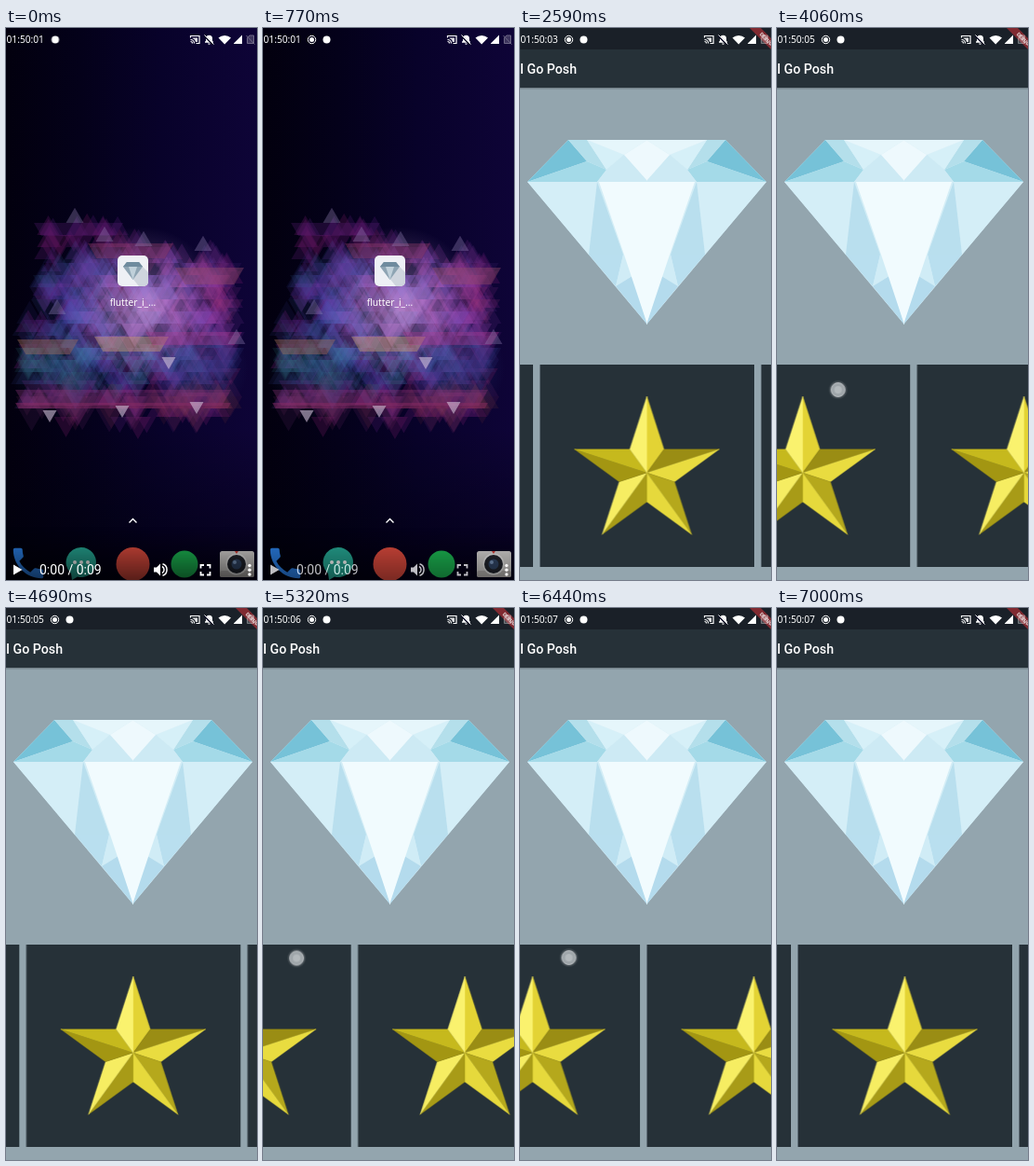
Write an HTML page with a canvas that moves like this. It is 270 px wide and 592 px high and loops after 7.07 s.

```html
<!DOCTYPE html>
<html lang="en">
<head>
<meta charset="utf-8">
<title>Phone demo</title>
<style>
html, body { margin: 0; width: 100%; height: 100%; overflow: hidden; background: #04000f; }
canvas, #stage { position: absolute; left: 0; top: 0; width: 100%; height: 100%; display: block; }
.sys { font-family: "Noto Sans", "Open Sans", sans-serif; fill: #fff; }
.rob { font-family: Roboto, Arial, sans-serif; fill: #fff; }
.anim { animation: 7070ms linear infinite; }

#controls { animation-name: controls; }
@keyframes controls { 0%, 9.9% { opacity: 1 } 13.9%, 100% { opacity: 0 } }

#rec { animation-name: rec; animation-timing-function: step-end; }
@keyframes rec { 0% { opacity: 0 } 9.9%, 100% { opacity: 1 } }
#note { animation-name: note; animation-timing-function: step-end; }
@keyframes note { 0% { transform: translateX(-15.5px) } 9.9%, 100% { transform: none } }

#clock { animation-name: clock; animation-timing-function: step-end; }
@keyframes clock {
  0% { transform: none }
  14.29% { transform: translateY(-20px) }
  28.43% { transform: translateY(-40px) }
  42.57% { transform: translateY(-60px) }
  56.72% { transform: translateY(-80px) }
  70.86% { transform: translateY(-100px) }
  85.01%, 100% { transform: translateY(-120px) }
}

#app { transform-origin: 136px 260px; animation-name: launch; }
@keyframes launch {
  0%, 22.77% { opacity: 0; transform: scale(.15); animation-timing-function: cubic-bezier(.2, .6, .3, 1) }
  24.5% { opacity: 1 }
  26.73%, 100% { opacity: 1; transform: none }
}
#splash { animation-name: splash; animation-timing-function: step-end; }
@keyframes splash { 0% { opacity: 1 } 30.69%, 100% { opacity: 0 } }
.late { animation-name: late; animation-timing-function: step-end; }
@keyframes late { 0% { opacity: 0 } 33.66%, 100% { opacity: 1 } }

/* three left swipes, each followed by a settle to the next card */
#track { animation-name: track; }
@keyframes track {
  0%, 50.495% { transform: none; animation-timing-function: cubic-bezier(.5, .1, .8, .8) }
  57.426% { transform: translateX(-108.5px) }
  58.416% { transform: translateX(-135px); animation-timing-function: cubic-bezier(.15, .6, .3, 1) }
  67.19%, 69.307% { transform: translateX(-238px); animation-timing-function: cubic-bezier(.5, .1, .8, .8) }
  75.248% { transform: translateX(-395px) }
  76.238% { transform: translateX(-420px); animation-timing-function: cubic-bezier(.15, .6, .3, 1) }
  83.45%, 87.27% { transform: translateX(-476px); animation-timing-function: cubic-bezier(.5, .1, .8, .8) }
  91.089% { transform: translateX(-598.5px) }
  92.08% { transform: translateX(-630px); animation-timing-function: cubic-bezier(.15, .6, .3, 1) }
  99.01% { transform: translateX(-713px) }
  100% { transform: translateX(-714px) }
}
#finger { animation-name: finger; }
@keyframes finger {
  0%, 30% { transform: translate(137px, 262px); animation-timing-function: step-end }
  48.515% { transform: translate(192.5px, 394px) }
  50.495% { transform: translate(174.5px, 393px); animation-timing-function: cubic-bezier(.5, .1, .8, .8) }
  57.426% { transform: translate(66px, 388px) }
  58.416% { transform: translate(39.5px, 387px); animation-timing-function: step-end }
  68.32% { transform: translate(211.5px, 384px) }
  69.307% { transform: translate(193.5px, 383px); animation-timing-function: cubic-bezier(.5, .1, .8, .8) }
  75.248% { transform: translate(36.5px, 375.5px) }
  76.238% { transform: translate(12px, 374px); animation-timing-function: step-end }
  86.28% { transform: translate(193.5px, 384px) }
  87.27% { transform: translate(175.5px, 383px); animation-timing-function: cubic-bezier(.5, .1, .8, .8) }
  91.089% { transform: translate(53px, 375px) }
  92.08%, 100% { transform: translate(21.5px, 373px) }
}
#touch { animation-name: touch; animation-timing-function: step-end; }
@keyframes touch {
  0% { opacity: 0 }
  21.07% { opacity: 1 } 23.2% { opacity: 0 }
  48.515% { opacity: 1 } 58.416% { opacity: 0 }
  68.32% { opacity: 1 } 76.238% { opacity: 0 }
  86.28% { opacity: 1 } 92.08%, 100% { opacity: 0 }
}
</style>
</head>
<body>
<canvas id="wall" width="270" height="592"></canvas>
<svg id="stage" viewBox="0 0 270 592" preserveAspectRatio="none">
  <defs>
    <linearGradient id="shade" x2="0" y2="1">
      <stop offset="0" stop-color="#000" stop-opacity="0"/>
      <stop offset=".7" stop-color="#000" stop-opacity=".42"/>
      <stop offset="1" stop-color="#000" stop-opacity=".6"/>
    </linearGradient>
    <linearGradient id="drop" x2="0" y2="1">
      <stop offset="0" stop-opacity=".25"/>
      <stop offset="1" stop-opacity="0"/>
    </linearGradient>
    <radialGradient id="halo">
      <stop offset=".55" stop-color="#fff" stop-opacity=".35"/>
      <stop offset="1" stop-color="#fff" stop-opacity="0"/>
    </radialGradient>
    <g id="half">
      <path fill="#d3edf6" d="M8 165L52 120H137V318Z"/>
      <path fill="#76c2d8" d="M8 165L52 120L72 143Z"/>
      <path fill="#a4dae8" d="M8 165L72 143L93 152L83 165Z"/>
      <path fill="#b4dfeb" d="M52 120H72L93 152L72 143Z"/>
      <path fill="#d6f0f8" d="M72 120L93 152L112 136Z"/>
      <path fill="#e6f6fb" d="M72 120H137L112 136Z"/>
      <path fill="#cdeaf4" d="M93 152L112 136L137 163V165H83Z"/>
      <path fill="#eef9fd" d="M112 136L137 120V164Z"/>
      <path fill="#d4eef7" d="M8 165H83L74 243Z"/>
      <path fill="#b9dfee" d="M83 165L74 243H111Z"/>
      <path fill="#b9dfef" d="M74 243H111L103 277Z"/>
      <path fill="#d0ecf6" d="M111 243L103 277L121 266Z"/>
      <path fill="#b4dbed" d="M103 277L121 266L137 318Z"/>
      <path fill="#f1fbfe" d="M85 165H137V318L112 243Z"/>
    </g>
    <g id="gem">
      <use href="#half"/>
      <use href="#half" transform="translate(273) scale(-1 1)"/>
    </g>
    <g id="star"></g>
  </defs>

  <g id="home">
    <rect x="120" y="244" width="33" height="33" rx="5" fill="#eef0f5"/>
    <path d="M126 256L147 256L153 262V272A5 5 0 0 1 148 277H143Z" fill="#cfd5de"/>
    <path d="M126 256L130 251H143L147 256L136.500 270Z" fill="#8ea4b3"/>
    <path d="M126 256H147L143 251H130Z" fill="#6f8b9e"/>
    <path d="M132 256H141L136.500 270Z" fill="#c0d0da"/>
    <text class="sys" x="136.500" y="298" font-size="10.200" text-anchor="middle">flutter_i_...</text>
    <path d="M132.500 530.500L136.500 526.500L140.500 530.500" fill="none" stroke="#fff" stroke-width="1.400"/>
    <path transform="translate(2.400 552.400) scale(1.800)" fill="#2a7de1" d="M6.620 10.790c1.440 2.830 3.760 5.140 6.590 6.590l2.200-2.200c.27-.27.67-.36 1.020-.24 1.120.37 2.330.57 3.570.57.55 0 1 .45 1 1V20c0 .55-.45 1-1 1-9.390 0-17-7.610-17-17 0-.55.45-1 1-1h3.500c.55 0 1 .45 1 1 0 1.250.2 2.450.57 3.570.11.35.03.74-.25 1.020l-2.200 2.200z"/>
    <path d="M81 557a16 16 0 1 1-4 31.500L71 592L70 585A16 16 0 0 1 81 557Z" fill="#26a693"/>
    <g fill="#fff"><circle cx="74" cy="573" r="2"/><circle cx="81" cy="573" r="2"/><circle cx="88" cy="573" r="2"/></g>
    <circle cx="136.500" cy="575" r="18" fill="#dd4b3e"/>
    <circle cx="192" cy="575" r="14.500" fill="#1db954"/>
    <rect x="230" y="561" width="37" height="28" rx="2.500" fill="#d9d7d5"/>
    <rect x="230" y="582" width="37" height="7" rx="2.500" fill="#bdb9b6"/>
    <circle cx="248" cy="575" r="11.500" fill="#f1f0ef"/>
    <circle cx="248" cy="575" r="10" fill="#23262f"/>
    <circle cx="248" cy="575" r="5.500" fill="#34496b"/>
    <circle cx="246" cy="573" r="2" fill="#7f9cc4"/>
    <path d="M246 561h4l-2 3z" fill="#d8423a"/>
  </g>

  <g id="controls" class="anim">
    <rect y="535" width="270" height="57" fill="url(#shade)"/>
    <g fill="#fff">
      <path d="M8 575.500V586.500L17.500 581Z"/>
      <text class="rob" x="36" y="585.500" font-size="14">0:00 / 0:09</text>
      <path d="M159 578.500h3l4-4v13l-4-4h-3z"/>
      <path d="M168 577.500a4 4 0 0 1 0 7M168.500 574.800a6.500 6.500 0 0 1 0 12.400" fill="none" stroke="#fff" stroke-width="1.500"/>
      <path d="M209.500 579.500v-3.500h3.500M216 576h3.500v3.500M219.500 583v3.500H216M213 586.500h-3.500V583" fill="none" stroke="#fff" stroke-width="1.800"/>
      <circle cx="262" cy="576.500" r="1.700"/><circle cx="262" cy="581.200" r="1.700"/><circle cx="262" cy="586" r="1.700"/>
    </g>
  </g>

  <g id="app" class="anim">
    <rect width="270" height="592" fill="#93a5ae"/>
    <rect y="64" width="270" height="2.500" fill="url(#drop)"/>
    <rect width="270" height="64" fill="#263138"/>
    <rect width="270" height="23" fill="#1a2028"/>
    <text class="rob" x="0" y="49" font-size="14.200" font-weight="500">I Go Posh</text>
    <use href="#gem" class="anim late"/>
    <g id="track" class="anim"></g>
    <path d="M247 0H259L270 11V23Z" fill="#9a2d33" opacity=".8"/>
    <text class="rob" transform="translate(263.500 13) rotate(45)" text-anchor="middle" font-size="5.400" font-weight="900" opacity=".8">DEBUG</text>
    <rect id="splash" class="anim" width="270" height="592" fill="#fff"/>
  </g>

  <g id="status" fill="#fff">
    <svg y="4" width="44" height="18"><g id="clock" class="anim sys" font-size="10.200"></g></svg>
    <g id="rec" class="anim">
      <circle cx="52.500" cy="12.500" r="4.200" fill="none" stroke="#fff"/>
      <circle cx="52.500" cy="12.500" r="2.500"/>
    </g>
    <circle id="note" class="anim" cx="68.500" cy="12.500" r="4"/>
    <path d="M198.500 10.500V8.500H208V16.500H204.500M198.500 12.500a4 4 0 0 1 4 4M198.500 14.500a2 2 0 0 1 2 2" fill="none" stroke="#fff" stroke-width="1.200"/>
    <path d="M200.500 10.500h5.500v4.500h-2a5 5 0 0 0-3.500-4z" opacity=".85"/>
    <path d="M214 15.800v-1l1-1v-2.500a3.500 3.500 0 0 1 7 0v2.500l1 1v1zM217.200 16.400h2.600a1.300 1.300 0 0 1-2.600 0z"/>
    <path d="M213.500 8.500L222.500 17.500" stroke="#11112a" stroke-width="2"/>
    <path d="M213.500 7.500L223.500 17.500" stroke="#fff"/>
    <path d="M228.500 10.500a10 10 0 0 1 13.500 0L235.200 17.500Z"/>
    <path d="M245 17V16.500L254 7.500V17Z"/>
    <g opacity=".4"><path d="M259.500 16.500V10.500L262 8H266.500V16.500Z" fill="#fff" fill-opacity=".5" stroke="#fff"/><path d="M258.500 8L267.500 17.500" stroke="#fff"/></g>
  </g>

  <g id="finger" class="anim">
    <g id="touch" class="anim">
      <circle r="10.500" fill="url(#halo)"/>
      <circle r="7.500" fill="#9fa6aa" stroke="#cdd1d3" stroke-opacity=".7"/>
      <circle r="4" fill="#b3b9bc"/>
    </g>
  </g>
</svg>
<script>
const $ = id => document.getElementById(id);

// star: ten shaded triangles around the centre
const shades = ['#e3d334', '#9a8d14', '#e9dc40', '#b5a81c', '#e6d93c',
                '#a89b17', '#f6ed62', '#a39612', '#c6b91d', '#faf26e'];
const tip = i => {
  const a = (i * 36 - 90) * Math.PI / 180, r = i % 2 ? 31.3 : 82;
  return (r * Math.cos(a)).toFixed(2) + ' ' + (r * Math.sin(a)).toFixed(2);
};
$('star').innerHTML = shades.map((c, i) =>
  `<path d="M0 0L${tip(i)}L${tip(i + 1)}Z" fill="${c}" stroke="${c}" stroke-width=".3"/>`).join('');

$('track').innerHTML = [-1, 0, 1, 2, 3, 4].map(k =>
  `<g transform="translate(${136.5 + 238 * k} 477)">
    <rect x="-115" y="-116" width="230.5" height="217" fill="#263138"/>
    <use href="#star" class="anim late"/></g>`).join('');

$('clock').innerHTML = [1, 2, 3, 4, 5, 6, 7].map((s, i) =>
  `<text x=".5" y="${12.3 + 20 * i}">01:50:0${s}</text>`).join('');

// wallpaper: dark bands and a seeded cloud of triangles
const g = $('wall').getContext('2d');
let seed = 77;
const rnd = () => (seed = (seed * 16807) % 2147483647) / 2147483647;

function tri(x, y, w, up, color, alpha) {
  const h = w * .86 * (up ? -1 : 1);
  g.globalAlpha = alpha;
  g.fillStyle = color;
  g.beginPath();
  g.moveTo(x - w / 2, y);
  g.lineTo(x + w / 2, y);
  g.lineTo(x, y + h);
  g.fill();
}
function slab(x, y, w, h, color, alpha) {
  g.globalAlpha = alpha;
  g.fillStyle = color;
  g.beginPath();
  g.moveTo(x, y);
  g.lineTo(x + w, y);
  g.lineTo(x + w - h * .58, y + h);
  g.lineTo(x + h * .58, y + h);
  g.fill();
}
function glow(x, y, r, rgb, alpha) {
  const fill = g.createRadialGradient(x, y, 0, x, y, r);
  fill.addColorStop(0, `rgba(${rgb},${alpha})`);
  fill.addColorStop(1, `rgba(${rgb},0)`);
  g.globalAlpha = 1;
  g.fillStyle = fill;
  g.fillRect(x - r, y - r, 2 * r, 2 * r);
}

const sky = g.createLinearGradient(0, 0, 270, 0);
[[0, '#02000e'], [.3, '#04011a'], [.62, '#08022a'], [1, '#0e0437']].forEach(s => sky.addColorStop(...s));
g.fillStyle = sky;
g.fillRect(0, 0, 270, 592);
const fade = g.createLinearGradient(0, 430, 0, 592);
fade.addColorStop(0, 'rgba(0,0,10,0)');
fade.addColorStop(1, 'rgba(0,0,10,.6)');
g.fillStyle = fade;
g.fillRect(0, 430, 270, 162);

const left = y => y < 250 ? 40 : y < 320 ? 50 - (y - 250) * .4 : 20;
const right = y => y < 228 ? 122 : y < 250 ? 190 : 244;

// dim purple rim, then a body running from blue to magenta
for (let i = 0; i < 230; i++) {
  const y = 222 + 13 * Math.floor(rnd() * 16);
  const x = left(y) + rnd() * (right(y) - left(y));
  tri(x, y, 20 + rnd() * 8, rnd() < .5, `hsl(${270 + 45 * rnd()},62%,25%)`, .3);
}
for (let i = 0; i < 560; i++) {
  const y = 252 + 13 * Math.floor(rnd() * 12.9);
  const x = left(y) + rnd() * (right(y) - left(y));
  const core = Math.max(0, 1 - Math.hypot((x - 145) / 120, (y - 305) / 95));
  const low = y > 385 ? 55 : y > 335 ? -35 : 0;
  const hue = 232 + x * .25 + low + 70 * (rnd() - .5);
  tri(x, y, 18 + rnd() * 14, rnd() < .5, `hsl(${hue},46%,${38 + 26 * core}%)`, .13 + .13 * core);
}
glow(145, 298, 85, '205,165,225', .45);
glow(60, 365, 55, '50,110,150', .28);
glow(205, 365, 55, '60,95,165', .28);

slab(30, 209, 96, 14, '#571b72', .3);
slab(88, 231, 92, 16, '#8d3b66', .4);
slab(182, 257, 74, 18, '#8f4a68', .42);
slab(12, 334, 66, 16, '#a8705a', .4);
slab(95, 331, 80, 16, '#d0a06a', .4);
slab(150, 326, 104, 14, '#b03a90', .35);
slab(10, 388, 232, 17, '#8c3478', .35);
slab(10, 402, 232, 6, '#8c2c62', .45);

[[74, 209], [212, 239], [248, 339], [55, 307], [106, 229], [148, 234]]
  .forEach(([x, y]) => tri(x, y, 19, true, '#a08cc0', .32));
[[47, 410], [125, 405], [205, 401], [175, 353]]
  .forEach(([x, y]) => tri(x, y, 15, false, '#d5c5dc', .58));
</script>
</body>
</html>
```
